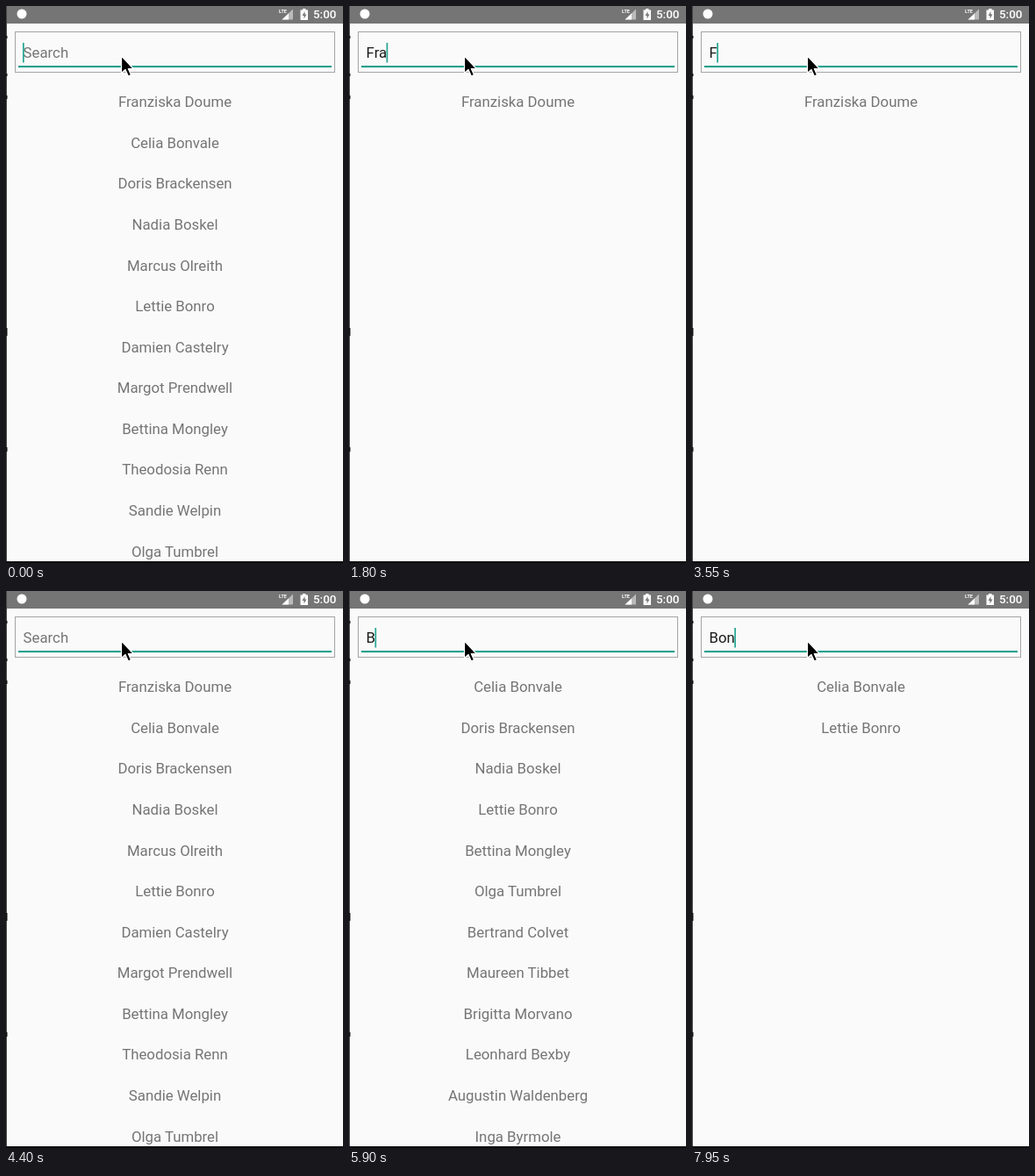
An HTML page for the animation above (8000 ms loop, 384 px wide and 635 px high).

```html
<!DOCTYPE html>
<html lang="en">
<head>
<meta charset="utf-8">
<title>Search list</title>
<style>
  html, body { margin: 0; width: 100%; height: 100%; overflow: hidden; background: #fafafa; }
  svg { display: block; width: 384px; height: 635px; }
  text { font-family: Roboto, Arial, sans-serif; font-size: 16.8px; }
  #list text { fill: #757575; text-anchor: middle; }
  #field { fill: #1c1c1c; }
  #field.hint { fill: #757575; }
  .clock { font-size: 13.4px; font-weight: 500; fill: #fff; }
  .lte { font-size: 5.5px; font-weight: 700; fill: #fff; }
</style>
</head>
<body>
<svg viewBox="0 0 384 635">
  <rect width="384" height="635" fill="#fafafa"/>
  <g id="list"></g>

  <!-- status bar -->
  <rect width="384" height="20" fill="#757575"/>
  <circle cx="18" cy="9" r="5.5" fill="#fff"/>
  <text class="lte" x="311" y="8">LTE</text>
  <path d="M327 3.5V15.5H314.5Z" fill="#bababa"/>
  <path d="M322 8.5V15.5H314.5Z" fill="#fff"/>
  <path d="M338 3h3.5v1.5h2.5V16h-8.5V4.5h2.5Z" fill="#fff"/>
  <path d="M340.5 6l-3 5h2v3.5l3-5h-2Z" fill="#757575"/>
  <text class="clock" x="350" y="14.3">5:00</text>

  <!-- search box -->
  <rect x="10.5" y="29.5" width="364" height="46" fill="none" stroke="#a4a4a8"/>
  <rect x="14" y="68" width="357" height="2" fill="#2b9f90"/>
  <rect x="14" y="70" width="357" height="1" fill="#d3f0e6"/>
  <text id="field" x="19.6" y="59"></text>
  <rect id="caret" y="42" width="1.7" height="22.5" fill="#23a592"/>

  <!-- window edges -->
  <path d="M.5 0V635" stroke="#444"/>
  <path d="M.75 34v3M.75 77v3M.75 102v4M.75 367v9M.75 503v5" stroke="#111" stroke-width="1.5"/>
  <path d="M0 634H384" stroke="#111" stroke-width="2"/>

  <!-- pointer -->
  <path d="M131.5 57V76.5L136 72.5L139.3 80L142.5 78.5L139.3 71.5H145.2Z"
        fill="#000" stroke="#fff" stroke-width="1.2" stroke-linejoin="round"/>
</svg>
<script>
const LOOP = 8000, DEBOUNCE = 300, BLINK = 500;
const names = [
  "Franziska Doume", "Celia Bonvale", "Doris Brackensen", "Nadia Boskel",
  "Marcus Olreith", "Lettie Bonro", "Damien Castelry", "Margot Prendwell",
  "Bettina Mongley", "Theodosia Renn", "Sandie Welpin", "Olga Tumbrel",
  "Bertrand Colvet", "Maureen Tibbet", "Brigitta Morvano", "Leonhard Bexby",
  "Augustin Waldenberg", "Inga Byrmole"
];
const edits = [
  [0, ""], [100, "F"], [350, "Fr"], [600, "Fra"], [2350, "Fr"], [3400, "F"],
  [3650, ""], [4900, "B"], [6100, "Bo"], [7500, "Bon"]
];
// the list follows only after a pause in typing
const queries = edits
  .filter((e, i) => !i || i === edits.length - 1 || edits[i + 1][0] - e[0] >= DEBOUNCE)
  .map(([at, text]) => [at ? at + DEBOUNCE : 0, text]);

const field = document.getElementById("field");
const caret = document.getElementById("caret");
const list = document.getElementById("list");

const rows = Array.from({ length: 12 }, (_, i) => {
  const row = document.createElementNS("http://www.w3.org/2000/svg", "text");
  row.setAttribute("x", 192.5);
  row.setAttribute("y", 115.3 + i * 46.57);
  return list.appendChild(row);
});

const latest = (steps, t) => steps.filter(s => s[0] <= t).pop();

function draw(t) {
  const [since, text] = latest(edits, t);
  const query = latest(queries, t)[1].toLowerCase();
  const found = names.filter(n => n.toLowerCase().includes(query));
  rows.forEach((row, i) => { row.textContent = found[i] || ""; });

  field.textContent = text || "Search";
  field.setAttribute("class", text ? "" : "hint");
  caret.setAttribute("x", 19 + (text ? field.getComputedTextLength() : 0));
  const on = Math.floor((t - since) / BLINK) % 2 === 0;
  caret.setAttribute("visibility", on ? "visible" : "hidden");
}

const start = performance.now();
function tick() {
  draw((performance.now() - start) % LOOP);
  requestAnimationFrame(tick);
}
tick();
</script>
</body>
</html>
```
